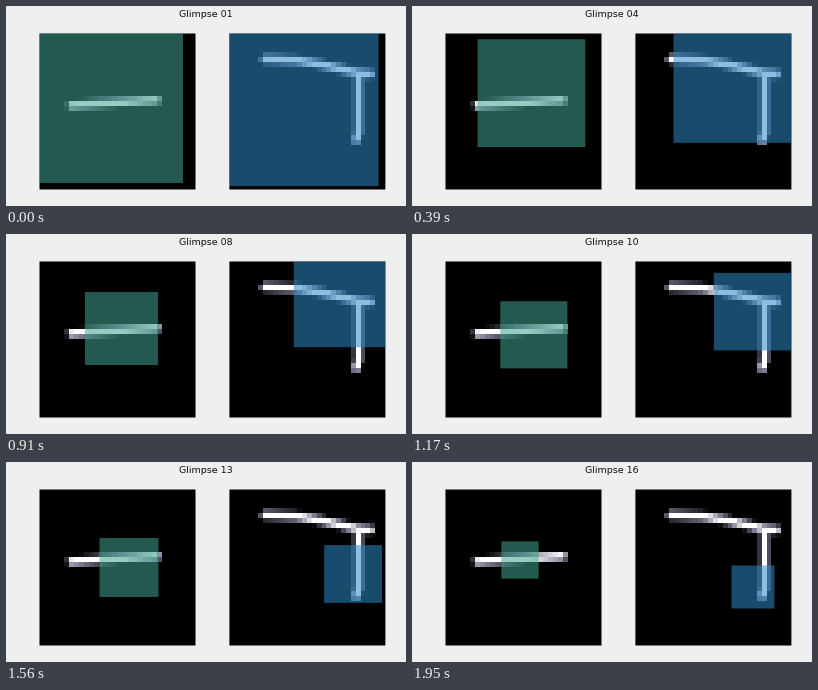
Recreate the animation shown at these times as a matplotlib script. Size 400x200 px, loop 2080 ms.

```python
import numpy as np
import matplotlib.pyplot as plt
from matplotlib.animation import FuncAnimation
from matplotlib.colors import LinearSegmentedColormap
from matplotlib.patches import Rectangle

W, H, DPI = 400, 200, 100
STEPS, INTERVAL = 16, 130
CELLS, SIDE, TOP = 32, 156, 27.5
REACH = 1.28  # distance in cells at which the ink fades out
INK = LinearSegmentedColormap.from_list("ink", ["black", "#74748a", "white"])

fig = plt.figure(figsize=(W / DPI, H / DPI), dpi=DPI, facecolor="#efefef")
ax = fig.add_axes([0, 0, 1, 1])


def segment_distance(x, y, a, b):
    (ax_, ay), (bx, by) = a, b
    dx, dy = bx - ax_, by - ay
    t = np.clip(((x - ax_) * dx + (y - ay) * dy) / (dx**2 + dy**2), 0, 1)
    return np.hypot(x - ax_ - t * dx, y - ay - t * dy)


def rasterize(lines):
    """Soft pen strokes on the cell grid; empty cells stay transparent."""
    y, x = np.mgrid[:CELLS, :CELLS] + 0.5
    dist = np.min([segment_distance(x, y, a, b)
                   for line in lines for a, b in zip(line, line[1:])], axis=0)
    level = np.clip(REACH - dist, 0, 1)
    return np.ma.masked_less(level, 0.03)


class Panel:
    def __init__(self, x, lines, color, size, path):
        self.x, self.size, self.path = x, size, np.array(path)
        self.add_box(x, TOP, SIDE, fc="black")
        ax.imshow(rasterize(lines), cmap=INK, vmin=0, vmax=1,
                  interpolation="nearest", zorder=1,
                  extent=(x, x + SIDE, TOP + SIDE, TOP))
        self.window = self.add_box(x, TOP, 1, fc=color, alpha=0.55, zorder=2)

    @staticmethod
    def add_box(x, y, side, **style):
        return ax.add_patch(Rectangle((x, y), side, side, ec="none",
                                      snap=False, **{"zorder": 0, **style}))

    def look(self, step):
        """Place the square window for this step, cut off at the panel."""
        steps, xs, ys = self.path.T
        half = self.size(step) / 2
        ends = np.array([-half, half])
        x0, x1 = np.clip(np.interp(step, steps, xs) + ends,
                         self.x, self.x + SIDE)
        y0, y1 = np.clip(np.interp(step, steps, ys) + ends, TOP, TOP + SIDE)
        self.window.set_bounds(x0, y0, x1 - x0, y1 - y0)


def cubic_shrink(step):
    u = step - 10.5
    return 66 - 2.2 * u - 0.1 * u**3


def steady_shrink(step):
    return 115 * np.exp(-0.0984 * (step - 6))


# Strokes are in cells; window paths are (step, centre x, centre y)
panels = [
    Panel(33.5, [[(6.5, 14.85), (23.9, 13.8)]], "#40a38f", cubic_shrink,
          [(1, 90.7, 90.7), (3, 124.4, 88.7), (6, 109.5, 84),
           (8, 115.5, 94.5), (11, 125, 104), (13, 123, 105.5),
           (16, 108, 98)]),
    Panel(223.4, [[(7.4, 5.4), (14, 5.65), (20, 6.7), (26.5, 8.2), (29, 8.4)],
                  [(26.55, 8.4), (26.55, 20.5), (26.05, 21.9)]],
          "#2f8ac8", steady_shrink,
          [(1, 278.5, 86), (3, 336.5, 75.5), (6, 321.5, 49.5),
           (8, 335, 66), (11, 343.5, 83.5), (13, 347, 112),
           (16, 341, 125)]),
]

ax.set(xlim=(0, W), ylim=(H, 0), aspect="auto")
ax.axis("off")
title = ax.text(W / 2, 4.3, "", ha="center", va="top", color="#101010",
                family="DejaVu Sans", size=9.5 * 72 / DPI)


def update(i):
    step = i + 1
    title.set_text(f"Glimpse {step:02d}")
    for panel in panels:
        panel.look(step)
    return [title] + [panel.window for panel in panels]


anim = FuncAnimation(fig, update, frames=STEPS, interval=INTERVAL, repeat=True)
plt.show()
```
